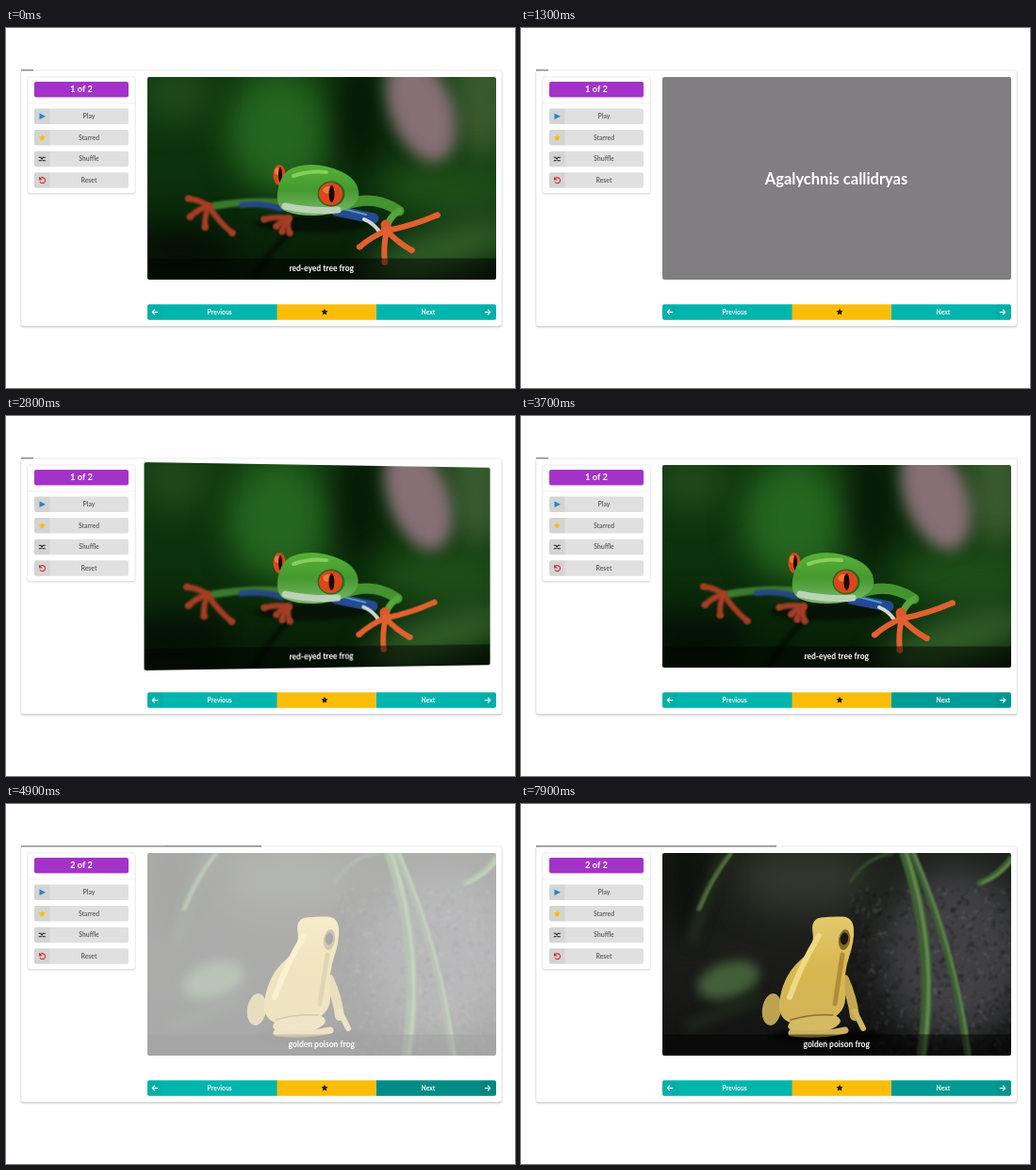
An HTML page with a canvas for the animation above (8 s loop, 540 by 382 pixels).

```html
<!DOCTYPE html>
<html lang="en">
<head>
<meta charset="utf-8">
<title>Flashcards</title>
<style>
  html, body { margin: 0; width: 540px; height: 382px; overflow: hidden; background: #fff; }
  canvas { position: absolute; left: 0; top: 0; }
  #card { position: absolute; left: 150px; top: 52px; width: 370px; height: 215px; perspective: 900px; }
  #card canvas { border-radius: 2px; backface-visibility: hidden; }
</style>
</head>
<body>
<canvas id="stage" width="540" height="382"></canvas>
<div id="card">
  <canvas id="back" width="370" height="215"></canvas>
  <canvas id="red" width="370" height="215"></canvas>
  <canvas id="gold" width="370" height="215"></canvas>
</div>
<script>
const LOOP = 8000, SWAP = 4500;
const TEAL = '#00b5ad', AMBER = '#fbbd08', PURPLE = '#a333c8';
const $ = id => document.getElementById(id);
const ramp = (t, from, to) => Math.max(0, Math.min(1, (t - from) / (to - from)));

// CSS "ease", cubic-bezier(.25, .1, .25, 1)
function ease(x) {
  const curve = (a, b, s) => 3 * a * s * (1 - s) ** 2 + 3 * b * s * s * (1 - s) + s ** 3;
  let lo = 0, hi = 1;
  for (let i = 0; i < 20; i++) {
    const mid = (lo + hi) / 2;
    if (curve(.25, .25, mid) < x) lo = mid; else hi = mid;
  }
  return curve(.1, 1, hi);
}

let g;

function box(x, y, w, h, fill, radius = 0) {
  g.fillStyle = fill;
  g.beginPath();
  g.roundRect(x, y, w, h, radius);
  g.fill();
}

function label(text, x, y, size, fill = '#fff') {
  g.font = `bold ${size}px Lato, sans-serif`;
  g.textAlign = 'center';
  g.fillStyle = fill;
  g.fillText(text, x, y);
}

function oval(x, y, rx, ry, fill, turn = 0) {
  g.fillStyle = fill;
  g.beginPath();
  g.ellipse(x, y, rx, ry, turn, 0, 7);
  g.fill();
}

// Curved stroke; bend is the sideways offset of its control point
function limb(color, width, x0, y0, x1, y1, bend = 0) {
  const dx = x1 - x0, dy = y1 - y0, k = bend / Math.hypot(dx, dy);
  g.strokeStyle = color;
  g.lineWidth = width;
  g.lineCap = 'round';
  g.beginPath();
  g.moveTo(x0, y0);
  g.quadraticCurveTo((x0 + x1) / 2 - dy * k, (y0 + y1) / 2 + dx * k, x1, y1);
  g.stroke();
}

// Four toes fanned out evenly, the first one longest
function hand(color, x, y, length, from, to) {
  for (let i = 0; i < 4; i++) {
    const a = from + (to - from) * i / 3, r = length * (i ? .6 : 1);
    const tx = x + r * Math.cos(a), ty = y + r * Math.sin(a);
    limb(color, 6, x, y, tx, ty, 3);
    oval(tx, ty, 3.4, 3, color);
  }
}

// Smooth closed outline through the middles of the key points
function outline(fill, points) {
  const at = i => points[i % points.length];
  const mid = i => [0, 1].map(k => (at(i)[k] + at(i + 1)[k]) / 2);
  g.fillStyle = fill;
  g.beginPath();
  g.moveTo(...mid(0));
  for (let i = 1; i <= points.length; i++) g.quadraticCurveTo(...at(i), ...mid(i));
  g.fill();
}

function blurred(px, draw) {
  g.save();
  g.filter = `blur(${px}px)`;
  draw();
  g.restore();
}

function vertical(y0, y1, ...colors) {
  const fade = g.createLinearGradient(0, y0, 0, y1);
  colors.forEach((c, i) => fade.addColorStop(i / (colors.length - 1), c));
  return fade;
}

function face(id, draw) {
  g = $(id).getContext('2d');
  g.translate(-150, -52);
  draw();
}

function caption(text) {
  box(150, 244.5, 370, 22.5, 'rgba(0,0,0,.5)');
  label(text, 334.7, 258, 8.5);
}

function eye(x, y, rx, ry, slit) {
  oval(x, y, rx, ry, '#dd4718');
  oval(x - 2, y - 4, rx / 2, ry / 3, '#f2793a');
  oval(x + 1, y, slit, ry * .75, '#160806');
}

function redEyedFrog() {
  box(150, 52, 370, 215, vertical(52, 267, '#10380f', '#0b300b', '#071b07'));
  blurred(16, () => {
    oval(290, 110, 55, 65, '#24651f');
    oval(180, 70, 35, 30, '#1f4a1b');
    oval(375, 85, 22, 70, '#061606');
    oval(505, 75, 35, 70, '#395a2f');
    oval(470, 170, 75, 30, '#1e4f18');
    oval(465, 235, 85, 26, '#305e27', -.3);
    oval(185, 235, 60, 22, '#040d04');
  });
  blurred(8, () => oval(440, 85, 33, 60, '#866f75', -.35));
  blurred(2, () => {
    oval(325, 208, 60, 9, '#061206');
    limb('#050f05', 6, 305, 212, 262, 267, 5);
  });

  // Soft-focus left side
  blurred(1.3, () => {
    limb('#3a7a2d', 8, 220, 189, 288, 185, -4);
    limb('#27458a', 6, 250, 188, 292, 192, -5);
    hand('#a83d24', 215, 189, 38, .85, 3.5);
    hand('#a43e27', 300, 202, 26, 3.1, 1.5);
  });

  blurred(.7, () => {
    limb('#234a94', 11, 350, 194, 390, 202);
    limb('#5a9ac0', 2, 358, 192, 382, 198);
    limb('#43942f', 11, 362, 187, 417, 194, -14);
    limb('#cfd9cd', 4, 380, 203, 396, 216, -3);
    limb('#56a63c', 7, 417, 194, 405, 208, 3);
    limb('#d9582e', 11, 403, 209, 404, 216);
    hand('#e2602f', 404, 215, 56, -.3, 2.6);
  });

  blurred(.6, () => {
    eye(290, 156, 6.5, 11, 2);
    outline(vertical(146, 198, '#57b038', '#45992f', '#79b866'), [
      [290, 158], [308, 145], [340, 145], [372, 160], [376, 186], [345, 199], [308, 199], [286, 190]]);
    limb('#bcd3b8', 7, 296, 189, 352, 193, 4);
    limb('#86cf5e', 4, 305, 157, 340, 153, -4);
  });
  oval(345, 176, 14.5, 13.5, '#2b651f');
  eye(344.5, 176, 12.5, 12, 3);
  caption('red-eyed tree frog');
}

function blade(x0, y0, x1, y1, bend, width) {
  limb('#3d6032', width, x0, y0, x1, y1, bend);
  limb('#688a54', width / 3, x0 + 2, y0, x1 + 2, y1, bend);
}

function goldenFrog() {
  box(150, 52, 370, 215, vertical(52, 267, '#1e211b', '#1c1d1b', '#111211'));
  blurred(18, () => {
    oval(300, 80, 70, 35, '#33372b');
    oval(460, 160, 75, 90, '#414145');
    oval(175, 80, 25, 70, '#0b0f0a');
  });

  let seed = 7;
  const rand = () => (seed = seed * 16807 % 2147483647) / 2147483647;
  blurred(1, () => {
    for (let i = 0; i < 900; i++) {
      const tone = rand() < .6 ? 'rgba(8,8,10,.4)' : 'rgba(150,148,152,.22)';
      oval(350 + rand() * 175, 90 + rand() * 180, .5 + rand() * 3, .4 + rand(), tone, rand() * 3);
    }
  });
  blurred(6, () => {
    oval(220, 187, 34, 19, '#435f39', -.3);
    limb('#26341f', 9, 218, 52, 182, 145, 6);
    limb('#202d1b', 10, 180, 235, 250, 206);
  });
  blurred(1.3, () => {
    blade(222, 52, 188, 112, 5, 4);
    blade(520, 58, 487, 84, -6, 7);
    limb('#2e4828', 4, 394, 52, 350, 82, 12);
    blade(407, 52, 425, 267, -26, 11);
    blade(415, 52, 474, 267, -16, 7);
  });

  blurred(2, () => oval(325, 246, 60, 8, '#070707'));
  blurred(.7, () => {
    oval(266, 218, 10, 17, '#bda252', .15);
    limb('#c4a650', 10, 343, 186, 354, 225, -3);
    limb('#d0b566', 6, 354, 220, 363, 238);
    outline(vertical(120, 230, '#e3c96c', '#d8b750', '#d2b45a'), [
      [307, 122], [330, 119], [352, 120], [354, 145], [342, 180], [346, 222],
      [305, 237], [270, 228], [280, 180], [312, 152]]);
    limb('#eed985', 6, 316, 140, 285, 205, 4);
    limb('#b08d38', 5, 341, 160, 333, 212);
    oval(311, 233, 28, 10, '#d5b963', -.12);
    limb('#8a7030', 1.5, 286, 229, 331, 224, -4);
    limb('#cdb15f', 7, 287, 243, 344, 240, 5);
    oval(343, 144, 6, 11, '#80672d', .15);
    oval(343, 143, 4.2, 6.5, '#191712', .15);
  });
  caption('golden poison frog');
}

function answer() {
  box(150, 52, 370, 215, '#807e80');
  label('Agalychnis callidryas', 334.5, 165.5, 16.5);
}

function star(x, y, r, fill) {
  g.fillStyle = fill;
  g.beginPath();
  for (let i = 0; i < 10; i++) {
    const a = i * Math.PI / 5 - Math.PI / 2, d = i % 2 ? r * .5 : r;
    g.lineTo(x + d * Math.cos(a), y + d * Math.sin(a));
  }
  g.fill();
}

function line(path, color, width = 1.1) {
  g.strokeStyle = color;
  g.lineWidth = width;
  g.lineCap = g.lineJoin = 'round';
  g.stroke(new Path2D(path));
}

function arrow(x, dir) {
  line(`M${x - 2.7 * dir} 301.5h${5.4 * dir}l${-2.3 * dir}-2.3m0 4.6l${2.3 * dir}-2.3`, '#fff', 1.2);
}

function panel(x, y, w, h, shadow) {
  g.save();
  g.shadowColor = `rgba(34,36,38,${shadow})`;
  g.shadowBlur = 2;
  g.shadowOffsetY = 1;
  box(x, y, w, h, '#fff', 2);
  g.restore();
  g.strokeStyle = 'rgba(34,36,38,.1)';
  g.lineWidth = .7;
  g.stroke();
}

function sidebar(count) {
  panel(23, 52, 114, 123.5, .14);
  box(23, 79.5, 114, .8, '#ececed');
  box(30, 57, 100, 16.5, PURPLE, 2);
  label(count, 80, 68, 9.3);
  ['Play', 'Starred', 'Shuffle', 'Reset'].forEach((text, i) => {
    const y = 85.5 + i * 22.6;
    box(30, y, 100, 16.5, '#e0e0e0', 2);
    box(30, y, 16.5, 16.5, 'rgba(0,0,0,.05)', [2, 0, 0, 2]);
    label(text, 88, y + 10.5, 6.8, 'rgba(0,0,0,.55)');
  });
  g.fillStyle = '#2185d0';
  g.fill(new Path2D('M35.5 90.4l6.5 3.3l-6.5 3.3z'));
  star(38.3, 116.6, 3.7, AMBER);
  line('M35.2 137.2h1.4l3 3.6h1.8M35.2 140.8h1.4l3-3.6h1.8', '#222');
  line('M35.5 158.6v2.3h2.3M35.7 160.7a3 3 0 1 1 .5 2.8', '#db2828');
}

function toolbar(shade) {
  const top = 293.3, h = 16.4;
  box(150, top, 138, h, TEAL, [2, 0, 0, 2]);
  box(392.5, top, 127.5, h, `rgb(0,${181 * shade},${173 * shade})`, [0, 2, 2, 0]);
  box(287.5, top, 105, h, AMBER);
  for (const x of [150, 503.5]) box(x, top, 16.5, h, 'rgba(0,0,0,.03)', 2);
  label('Previous', 226.7, 303.8, 6.8);
  label('Next', 448, 303.8, 6.8);
  star(338, 301.5, 3.7, '#1c1a10');
  arrow(158, -1);
  arrow(511, 1);
}

function progress(t) {
  const width = 13 + 242 * ease(ramp(t, SWAP, SWAP + 100));
  box(16, 44, width, 1.4, '#888');
  const pulse = ease((t + 1800) % 2000 / 2000);
  if (t > SWAP) box(16, 44, width * pulse, 1.4, `rgba(255,255,255,${.3 * (1 - pulse)})`);
}

// Hover, then focus, then hover again
function nextShade(t) {
  return 1 - .138 * ramp(t, 3620, 3700) - .087 * ramp(t, 3780, 3880) + .075 * ramp(t, 7800, 7900);
}

function frame(now) {
  const t = now % LOOP;
  const second = t >= SWAP;
  g = $('stage').getContext('2d');
  g.clearRect(0, 0, 540, 382);
  panel(16, 45, 510, 271.5, .28);
  progress(t);
  sidebar(second ? '2 of 2' : '1 of 2');
  toolbar(nextShade(t));

  const angle = 180 * (ease(ramp(t, 670, 1270)) - ease(ramp(t, 2355, 2955)));
  $('red').style.transform = $('gold').style.transform = `rotateY(${angle}deg)`;
  $('back').style.transform = `rotateY(${angle - 180}deg)`;
  $('back').style.visibility = angle > 90 ? 'visible' : 'hidden';
  $('red').style.opacity = second ? 0 : 1 - ramp(t, 3780, SWAP);
  $('gold').style.opacity = second ? ramp(t, 4610, 5400) : 0;
  requestAnimationFrame(frame);
}

face('red', redEyedFrog);
face('gold', goldenFrog);
face('back', answer);
requestAnimationFrame(frame);
</script>
</body>
</html>
```
